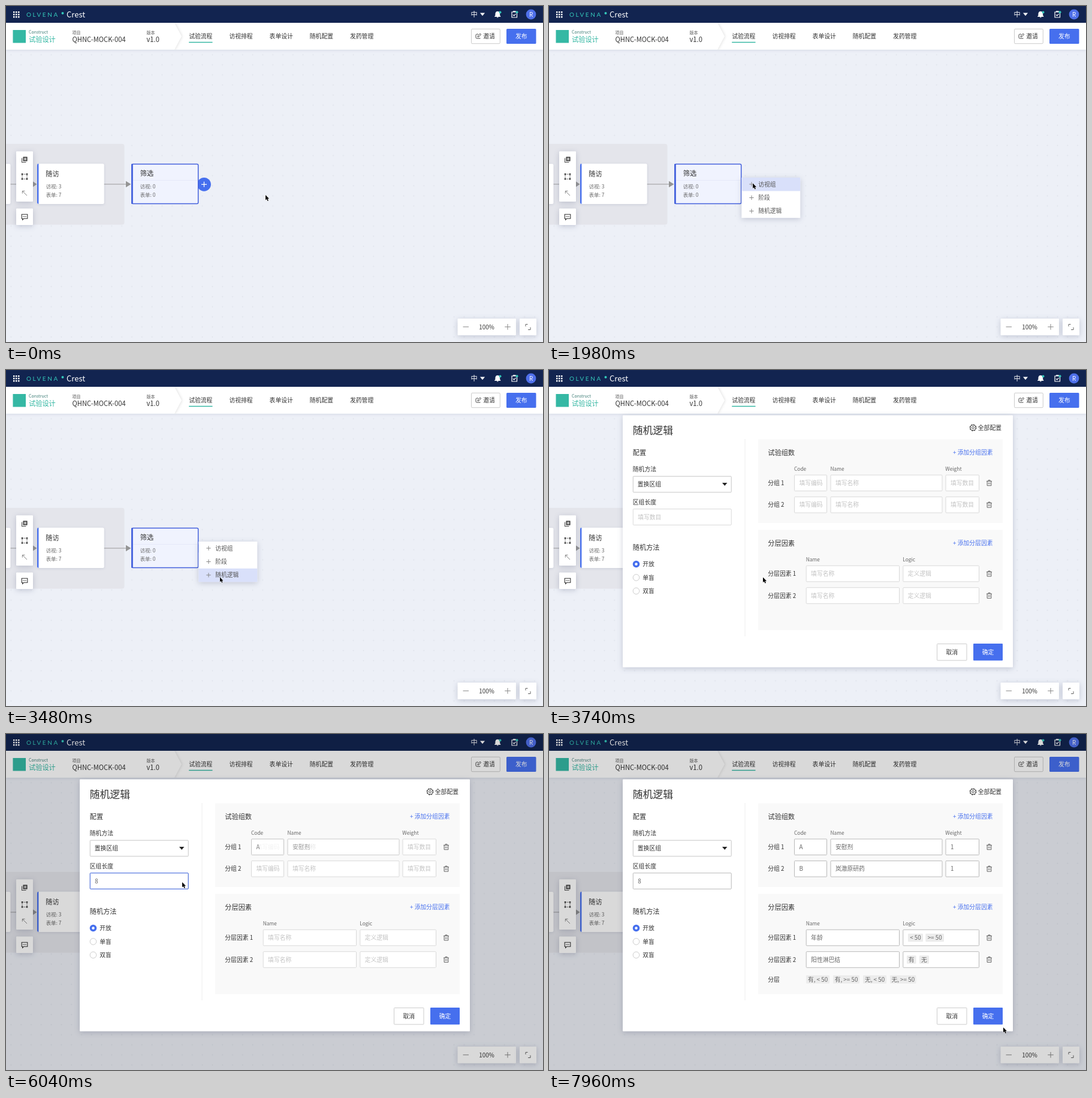
Write an HTML page that moves like this. It is 896x560 px and loops after 8000 ms.

```html
<!DOCTYPE html>
<html lang="zh-CN">
<head>
<meta charset="utf-8">
<style>
  html, body { margin: 0; width: 100%; height: 100%; overflow: hidden; background: #edf0f7; }
  svg { display: block; width: 100%; height: 100%; font-family: "Noto Sans CJK SC", "Noto Sans CJK", "Noto Sans", sans-serif; }
  text { white-space: pre; }
  .soft { filter: drop-shadow(0 1px 2px rgba(60, 70, 110, .14)); }
  .deep { filter: drop-shadow(0 2px 5px rgba(40, 50, 90, .22)); }
</style>
</head>
<body>
<svg id="stage" viewBox="0 0 896 560"></svg>
<script>
const BLUE = '#466fee', TEAL = '#2fb5a0', INK = '#333', GRAY = '#666', PALE = '#c3c3c3';
const M = 9.8, L = 11.2, S = 8.4; // text sizes

// --- drawing helpers; text is placed by its vertical centre ---
const esc = s => s.replace(/&/g, '&amp;').replace(/</g, '&lt;');
const text = (x, cy, s, size = M, fill = INK, more = '') =>
  `<text x="${x}" y="${cy + size * .37}" font-size="${size}" fill="${fill}" ${more}>${esc(s)}</text>`;
const mid = (x, cy, s, size, fill, more = '') => text(x, cy, s, size, fill, `text-anchor="middle" ${more}`);
const head = (x, cy, s, size = L) => text(x, cy, s, size, INK, 'font-weight="500"');
const box = (x1, y1, x2, y2, fill, more = '') =>
  `<rect x="${x1}" y="${y1}" width="${x2 - x1}" height="${y2 - y1}" fill="${fill}" ${more}/>`;
const path = (d, stroke, w = 1, fill = 'none', more = '') =>
  `<path d="${d}" stroke="${stroke}" stroke-width="${w}" fill="${fill}" ${more}/>`;
const dot = (x, y, r, fill, more = '') => `<circle cx="${x}" cy="${y}" r="${r}" fill="${fill}" ${more}/>`;
const group = (s, more = '') => `<g ${more}>${s}</g>`;
const at = (x, y, s) => group(s, `transform="translate(${x} ${y})"`);
const plus = (x, y, r, color, w = 1) => path(`M${x - r} ${y}h${2 * r}M${x} ${y - r}v${2 * r}`, color, w);
const frame = (x1, cy, x2, color, fill = 'none') =>
  box(x1 + .5, cy - 13.3, x2 - .5, cy + 13.3, fill, `rx="1" stroke="${color}"`);

function header() {
  let s = box(0, 0, 896, 28, '#122450');
  for (let i = 0; i < 9; i++) {
    const x = 12 + i % 3 * 4, y = 9 + Math.floor(i / 3) * 4;
    s += box(x, y, x + 2.5, y + 2.5, '#fff');
  }
  return s +
    text(34, 14.5, 'OLVENA', 10, '#35c9bb', 'font-family="Lato, sans-serif" letter-spacing="2.6"') +
    dot(94.5, 12, 2, '#35c9bb') + text(101, 14, 'Crest', 13, '#fff') +
    mid(781, 14, '中', L, '#fff') + path('M791 11.5h8l-4 5z', 'none', 0, '#fff') +
    path('M815.5 17.5h9.5l-1.3-1.8v-3a3.4 3.4 0 0 0-6.8 0v3zM819 18.8h2.5', '#fff', 1, '#fff') +
    dot(824.5, 10.5, 2, '#35c9bb') +
    path('M844 10h8.5v9h-8.5zM846.5 10V8.8h3.5V10M846 14.5l1.7 1.7 2.8-3', '#fff', 1.2) +
    dot(852.5, 10.3, 2, '#35c9bb') +
    dot(876, 14, 8.4, '#4f70ea') + mid(876, 14, 'R', M, '#fff');
}

function navBar() {
  const tabs = ['试验流程', '访视排程', '表单设计', '随机配置', '发药管理'];
  return box(0, 28, 896, 72.8, '#fff', 'class="soft"') +
    path('M0 28H281L293 50.4L281 72.8H0z', 'none', 0, '#fff',
      'style="filter:drop-shadow(1px 0 2px rgba(0,0,0,.12));clip-path:inset(0 -8px 0 0)"') +
    box(11.5, 40, 33, 61.5, '#35b8a4') +
    text(38, 43.7, 'Construct', 7, '#3f7f78') + text(38, 55.5, '试验设计', L, TEAL) +
    text(110.5, 44, '项目', 7, '#555') + head(110.5, 55.5, 'QHNC-MOCK-004') +
    text(234.5, 44, '版本', 7, '#555') + head(234.5, 55.5, 'v1.0') +
    tabs.map((s, i) => text(305.2 + i * 67.2, 50.3, s)).join('') +
    box(305.2, 59.8, 344.5, 61.2, TEAL) +
    box(776.5, 38.3, 824.3, 62.7, '#fff', 'rx="1.5" stroke="#ccc"') +
    path('M788 47h-2.5a1.5 1.5 0 0 0-1.5 1.5v4a1.5 1.5 0 0 0 1.5 1.5h6M787 51.5l.5-2 3.5-3.5 1.6 1.6-3.6 3.5z', '#444') +
    text(796.3, 50.3, '邀请') +
    box(835, 38, 884.5, 63, BLUE, 'rx="1.5"') + mid(859.7, 50.3, '发布', M, '#fff');
}

function board() {
  const info = (x, a, b) => text(x, 301, '访视: ' + a, S, GRAY) + text(x, 315.3, '表单: ' + b, S, GRAY);
  return `<defs><pattern id="dots" width="16.8" height="16.8" patternUnits="userSpaceOnUse" y="72.8">
      ${dot(8.4, 8.4, .9, '#dcdfe8')}</pattern></defs>` +
    box(0, 0, 896, 560, '#edf0f7') + box(0, 72.8, 896, 560, 'url(#dots)') +
    box(-6, 229.8, 197.5, 364.5, '#e4e5eb', 'rx="4"') +
    path('M7 297h40M163 297h40', '#999') +
    path('M44 291.7l7.5 5.3-7.5 5.3zM200 291.7l8.5 5.3-8.5 5.3z', 'none', 0, '#949494') +
    box(-20, 263, 7.5, 330, '#fff', 'rx="2.5" class="soft"') +
    box(52, 262.8, 163.7, 330, '#fff', 'rx="2.5" class="soft"') +
    path('M54.4 262.8q-2.4 0-2.4 2.4v62.4q0 2.4 2.4 2.4z', 'none', 0, BLUE) +
    text(66.3, 280, '随访', L) + info(66.7, 3, 7) +
    dot(330.5, 297.3, 11.4, BLUE) + plus(330.5, 297.3, 4.5, '#fff', 1.2) +
    box(209.9, 263.5, 320.7, 329.5, '#f0f3fe', 'rx="2" stroke="#4360dc" stroke-width="1.5"') +
    box(209.2, 263.3, 211.8, 329.7, '#4360dc') +
    path('M212 290.5h108', '#e3e7f6', .8) +
    text(223.7, 278.5, '筛选', L) + info(223.7, 0, 0);
}

function tools() {
  return box(17, 242.3, 45, 326, '#fff', 'rx="1" class="deep"') +
    box(17, 337.5, 45, 365, '#fff', 'rx="1" class="deep"') +
    at(31, 256, box(-2.7, -4.7, 4.7, 2.7, '#555', 'rx=".8"') + plus(1, -1, 2.2, '#fff') + path('M-4.5-2.5v7h7', '#555', 1.1)) +
    at(31, 284.3, path('M-4-4H4V4H-4z', '#555', 1, 'none', 'stroke-dasharray="2 1.2"') +
      [[-4, -4], [4, -4], [-4, 4], [4, 4]].map(([x, y]) => box(x - 1.3, y - 1.3, x + 1.3, y + 1.3, '#444')).join('')) +
    path('M35 316l-7.5-7.5M27.3 312.5v-4.2h4.2', '#888') +
    path('M26.2 347.3h9.6v7h-6.2l-2 2v-2h-1.4z', '#333', 1.1) +
    path('M28.3 350.8h1.2M30.4 350.8h1.2M32.5 350.8h1.2', '#333', 1.2) +
    box(753.5, 521, 851, 548.8, '#fff', 'rx="1" class="deep"') +
    box(857, 521, 885, 548.8, '#fff', 'rx="1" class="deep"') +
    path('M762.5 534.8h9.5', '#888') + plus(837, 534.8, 4.8, '#888') +
    mid(802, 535, '100%', M, INK, 'font-weight="500"') +
    path('M867 534v-3.5h3.5M875 535.5v4h-4', '#666');
}

function menu() {
  const rows = ['访视组', '阶段', '随机逻辑'];
  return box(321.3, 286, 419.3, 353.2, '#fff', 'class="deep"') +
    box(321.3, 286, 419.3, 308.4, '#d9e0fa', 'id="pick"') +
    rows.map((s, i) => plus(338, 297 + i * 22.4, 3.7, '#888') + text(349.2, 297 + i * 22.4, s, M, '#555')).join('');
}

// --- form fields: each crossfades from its placeholder to its content ---
const FADE = 200, fades = [];
function fading(start, empty, full) {
  const i = fades.push(start) - 1;
  return group(empty, `id="empty${i}"`) + group(full, `id="full${i}" opacity="0"`);
}
const field = (start, x1, cy, x2, hint, content) => box(x1, cy - 13.5, x2, cy + 13.5, '#fff') +
  fading(start, frame(x1, cy, x2, '#d9d9d9') + text(x1 + 8.4, cy, hint, M, PALE),
    frame(x1, cy, x2, '#b9b9b9') + (content[0] === '^' ? content.slice(1) : text(x1 + 8.4, cy, content, M, GRAY)));
const tag = (x1, cy, x2, s) => box(x1, cy - 6.7, x2, cy + 6.7, '#ececec', 'rx="1"') + mid((x1 + x2) / 2, cy, s, M, GRAY);
const bin = cy => at(734.5, cy, path('M-4.5-3h9M-1.5-3v-1.6h3V-3M-3.4-3v7.4h6.8V-3M-1.2-.8v3M1.2-.8v3', '#555', .9));

function dialog() {
  const groupRow = (cy, n, code, name, times) => text(365.3, cy, '分组 ' + n) +
    field(times[0], 409, cy, 464, '填写编码', code) +
    field(times[1], 469.5, cy, 656.5, '填写名称', name) +
    field(times[2], 661.5, cy, 718, '填写数目', '1') + bin(cy);
  const factorRow = (cy, n, name, tags, times) => text(365.3, cy, '分层因素 ' + n) +
    field(times[0], 428.7, cy, 585, '填写名称', name) +
    field(times[1], 590.3, cy, 718, '定义逻辑', '^' + tags) + bin(cy);
  const radios = ['开放', '单盲', '双盲'].map((s, i) => {
    const y = 323.5 + i * 22.4;
    return (i ? dot(145.5, y, 5.3, '#fff', 'stroke="#ccc"') : dot(145.5, y, 5.8, BLUE) + dot(145.5, y, 2.2, '#fff')) +
      text(156.3, y, s);
  }).join('');
  const link = (cy, s) => text(740.5, cy, s, M, BLUE, 'text-anchor="end"');
  return box(123, 75.6, 774, 495.5, '#fff', 'rx="1" class="deep"') +
    text(139.8, 101, '随机逻辑', 16.8) +
    dot(707.5, 96.2, 4.6, 'none', 'stroke="#444" stroke-width="1.1"') +
    dot(707.5, 96.2, 5.3, 'none', 'stroke="#444" stroke-width="1.1" stroke-dasharray="2.1 2.06"') +
    dot(707.5, 96.2, 1.9, 'none', 'stroke="#444"') +
    text(715.8, 96.2, '全部配置') +
    head(139.8, 138, '配置') + text(139.8, 165, '随机方法') +
    frame(139.8, 190.5, 304.7, '#c6c6c6', '#fff') + text(147.8, 190.5, '置换区组') +
    path('M289 188h8.4l-4.2 5z', 'none', 0, '#222') +
    text(139.8, 220.3, '区组长度') +
    field(5720, 139.8, 245, 304.7, '填写数目', '8') +
    group(frame(139.8, 245, 304.7, BLUE), 'id="focus"') +
    head(139.8, 295.5, '随机方法') + radios +
    path('M327 115v329', '#ececec') +
    box(349, 115.5, 757, 255, '#f9f9f9') + head(365.3, 138, '试验组数') + link(137.5, '+ 添加分组因素') +
    text(409, 165, 'Code', S, GRAY) + text(469.5, 165, 'Name', S, GRAY) + text(661.3, 165, 'Weight', S, GRAY) +
    groupRow(188.3, 1, 'A', '安慰剂', [5880, 5920, 6060]) +
    groupRow(224.7, 2, 'B', '岚澈原研药', [6180, 6320, 6440]) +
    box(349, 266.5, 757, 433.5, '#f9f9f9') + head(365.3, 289, '分层因素') + link(288.5, '+ 添加分层因素') +
    text(428.7, 316, 'Name', S, GRAY) + text(590.3, 316, 'Logic', S, GRAY) +
    factorRow(339.5, 1, '年龄', tag(599, 339.5, 624, '< 50') + tag(628.3, 339.5, 659, '>= 50'), [6620, 6650]) +
    factorRow(376, 2, '阳性淋巴结', tag(597, 376, 612.5, '有') + tag(618, 376, 634, '无'), [6780, 6920]) +
    fading(7100, '', text(365.3, 409, '分层') + tag(429, 409, 468, '有, < 50') + tag(474, 409, 518, '有, >= 50') +
      tag(524, 409, 563, '无, < 50') + tag(569, 409, 612.5, '无, >= 50')) +
    box(647.5, 456.4, 697, 484, '#fff', 'rx="1" stroke="#ccc"') + mid(672.2, 470.3, '取消', M, INK) +
    box(708, 456, 757, 484.3, BLUE, 'rx="1"') + mid(732.5, 470.3, '确定', M, '#fff');
}

document.getElementById('stage').innerHTML =
  board() + header() + navBar() + tools() + group(menu(), 'id="menu"') +
  box(0, 0, 896, 560, '#000', 'id="shade"') + group(dialog(), 'id="dialog"') +
  path('M0 0V8.6L2 6.8L3.4 10L4.9 9.3L3.5 6.3H6.1Z', '#fff', 1, '#000', 'id="cursor" paint-order="stroke"');

// --- motion ---
const LOOP = 8000;
const moves = [ // start, end, x, y
  [1280, 1800, 340, 295.5], [2280, 2700, 357, 319.5], [3020, 3180, 357, 345.5],
  [4960, 5420, 294, 247], [6560, 6800, 286, 351], [7480, 7960, 758, 489]
];
const span = (t, a, b) => Math.min(1, Math.max(0, (t - a) / (b - a)));
const ease = p => p < .5 ? 4 * p ** 3 : 1 - (2 - 2 * p) ** 3 / 2;
const set = (id, name, value) => document.getElementById(id).setAttribute(name, value);

function draw(t) {
  let x = 433, y = 315;
  for (const [a, b, tx, ty] of moves) {
    const p = ease(span(t, a, b));
    x += (tx - x) * p;
    y += (ty - y) * p;
  }
  const press = t >= 3480 && t < 3540 ? .9 : 1;
  set('cursor', 'transform', `translate(${x} ${y}) scale(${press})`);

  const row = Math.min(2, Math.max(0, Math.floor((y - 286) / 22.4)));
  set('pick', 'y', 286 + row * 22.4);
  set('menu', 'opacity', t < 3740 ? span(t, 1840, 1960) : 0);

  set('shade', 'opacity', .15 * span(t, 3740, 4040));
  set('dialog', 'opacity', t < 3740 ? 0 : 1);
  set('focus', 'opacity', span(t, 5400, 5480) * (1 - span(t, 6200, 6320)));
  fades.forEach((start, i) => {
    const p = span(t, start, start + FADE);
    set('empty' + i, 'opacity', 1 - p);
    set('full' + i, 'opacity', p);
  });
}

const begin = performance.now();
function tick() {
  draw((performance.now() - begin) % LOOP);
  requestAnimationFrame(tick);
}
tick();
</script>
</body>
</html>
```
